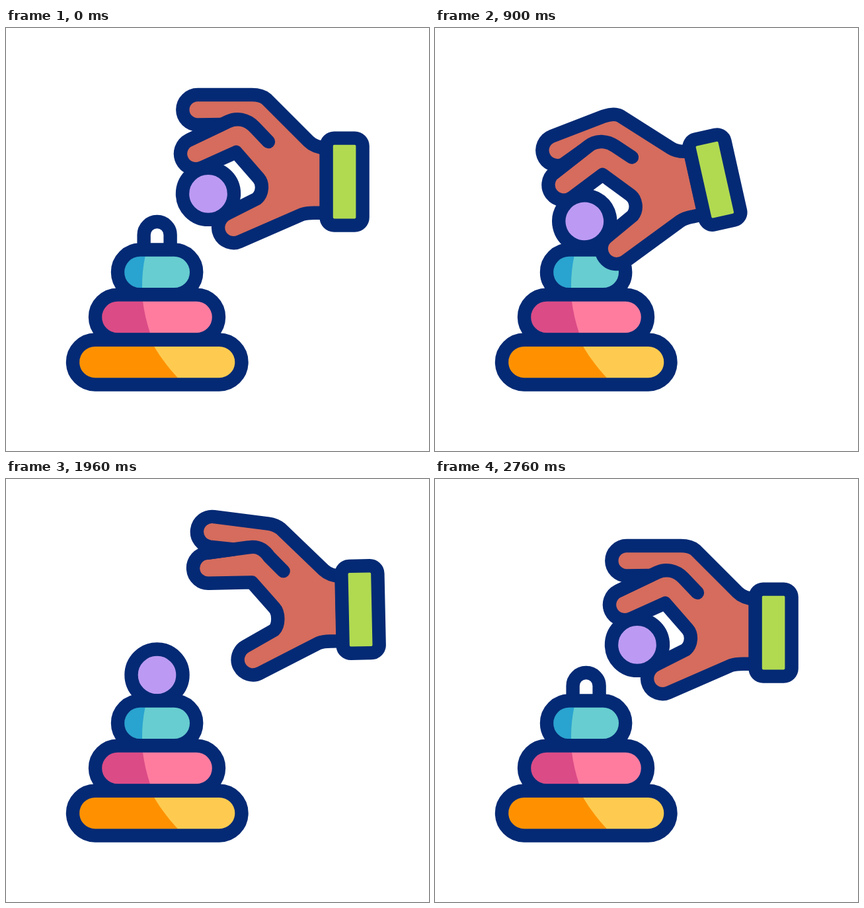
Animation of 640x640 px, one loop 3.2 s. Source, as an HTML page:

```html
<!DOCTYPE html>
<html lang="en">
<head>
<meta charset="utf-8">
<title>Stacking toy</title>
<style>
  html, body { margin: 0; height: 100%; overflow: hidden; background: #fff; }
  svg { display: block; width: 100vw; height: 100vh; }
</style>
</head>
<body>
<svg viewBox="0 0 640 640" fill="none" stroke="#042a75" stroke-width="20.4" stroke-linecap="round" stroke-linejoin="round">
  <path id="pole" fill="#fff" d="M208.6 345V313a20 20 0 0 1 40 0V345"/>
  <circle id="ball" r="39" fill="#bc9af3"/>
  <g id="rings"></g>
  <g id="hand">
    <path id="skin" fill="#d56c5d"/>
    <path id="knuckle"/>
    <rect x="484.6" y="166.6" width="55" height="132" rx="12" fill="#b1da51"/>
  </g>
</svg>
<script>
const LOOP = 3200, GRAB = 960, REGRAB = 2200;
const el = id => document.getElementById(id);

// Rings from bottom to top: left, top, width, light, dark, shade edge (top, control, bottom x)
const rings = [
  [101, 471.7, 255.5, '#fecb50', '#ff9100', 224, 238, 260],
  [135, 403.6, 187, '#ff7c9f', '#db4b86', 207, 210, 218],
  [169, 335.5, 119.2, '#67cdd0', '#29a3d0', 210.5, 205.5, 206],
];
el('rings').innerHTML = [2, 1, 0].map(i => {
  const [x, y, w, light, dark, a, b, c] = rings[i], r = 23.9;
  const box = `x="${x}" y="${y}" width="${w}" height="67.8" rx="33.9"`;
  return `<g id="ring${i}"><rect ${box} fill="${light}" stroke="none"/>
    <path fill="${dark}" stroke="none" d="M${a} ${y + 10}Q${b} ${y + 34} ${c} ${y + 57.8}H${x + 10 + r}a${r} ${r} 0 0 1 0 ${-2 * r}z"/>
    <rect ${box}/></g>`;
}).join('');

// Keys: time, cuff centre x, y, angle
const handKeys = [
  [220, 512, 232.6, 0], [420, 541, 228, 5], [600, 481.5, 250, 10], [900, 423.3, 229.6, -12.6],
  [GRAB, 425.2, 232.7, -13], [1050, 430, 231, -13], [1280, 526, 203, -10], [1500, 538.5, 195, -6.2],
  [1790, 543, 199.5, 1], [1960, 536, 197.5, -1.2], [REGRAB, 425.2, 232.7, -13],
  [2460, 492, 212.5, -8.9], [2760, 512, 232.6, 0],
];
const openKeys = [[GRAB, 0], [1120, 1], [2040, 1], [REGRAB, 0]];
const indexKeys = [[700, 0], [900, -1], [GRAB, -1], [1120, 1], [2040, 1], [REGRAB, -1], [2400, 0]];

// Monotone cubic interpolation of column c
function sample(keys, t, c) {
  const last = keys.length - 1;
  if (t <= keys[0][0]) return keys[0][c];
  if (t >= keys[last][0]) return keys[last][c];
  const slope = i => (keys[i + 1][c] - keys[i][c]) / (keys[i + 1][0] - keys[i][0]);
  const tangent = i => {
    if (i === 0 || i === last) return 0;
    const a = slope(i - 1), b = slope(i);
    return a * b <= 0 ? 0 : 2 * a * b / (a + b);
  };
  const i = keys.findIndex(k => k[0] > t) - 1;
  const h = keys[i + 1][0] - keys[i][0], s = (t - keys[i][0]) / h, q = 1 - s;
  return keys[i][c] * q * q * (1 + 2 * s) + keys[i + 1][c] * s * s * (3 - 2 * s)
    + h * s * q * (tangent(i) * q - tangent(i + 1) * s);
}

// Each piece hops in turn, from the bottom ring up to the ball
function hop(i, t) {
  const p = (t - 1171 - i * 60) / 400;
  return p > 0 && p < 1 ? -32.3 * Math.sin(Math.PI * p) ** 2 : 0;
}

function drawHand(open, index) {
  const mix = k => (x, y, dx = 0, dy = 0) => `${x + k * dx} ${y + k * dy} `;
  const o = mix(open), u = mix(index), cap = 'A20 20 0 0 0 ';
  const fingerTop = o(277, 169.5, 5.3, -27.5);
  el('skin').setAttribute('d',
    'M485 182C473 181 465 178.5 458 171.5L394 107.5C388 102.5 ' + u(381, 101, 3, 0) + u(372, 101, 4, -1.3) +
    'L' + u(290, 101, 4, -13.5) + cap + u(290, 146.4, -3, -13.5) +
    'L' + o(326, 146, -4, -8.5) + 'L' + fingerTop + cap + o(297, 211, -12.3, -23) +
    'L' + o(348, 188, 1, 0) + 'L382 227C389 235 ' + o(389, 250, 0, 3) + o(379, 258.5, 2, 2.5) +
    'L' + o(334.5, 281, 3, 3.6) + cap + o(354, 323, 4.8, 2.4) +
    'L448 282C455 279.5 460 279.7 468 279.7H485z');
  el('knuckle').setAttribute('d',
    'M' + fingerTop + 'L' + o(336, 141.5, 9, -6.5) +
    'C' + o(348.6, 135.4, 9.4, -2.4) + o(364, 137.5, 4, 0) + '376 150L397 172');
}

function render(t) {
  const [x, y, angle] = [1, 2, 3].map(c => sample(handKeys, t, c));
  drawHand(sample(openKeys, t, 1), sample(indexKeys, t, 1));
  el('hand').setAttribute('transform', `translate(${x} ${y}) rotate(${angle}) translate(-512 -232.6)`);

  rings.forEach((_, i) => el('ring' + i).setAttribute('transform', `translate(0 ${hop(i, t)})`));
  el('pole').setAttribute('transform', `translate(0 ${hop(2, t)})`);

  const held = t < GRAB || t > REGRAB;
  el('ball').setAttribute('transform', held
    ? `translate(${x} ${y}) rotate(${angle}) translate(-206 18.3)`
    : `translate(228.5 ${296.5 + hop(3, t)})`);
}

const start = performance.now();
function frame() {
  render((performance.now() - start) % LOOP);
  requestAnimationFrame(frame);
}
frame();
</script>
</body>
</html>
```
